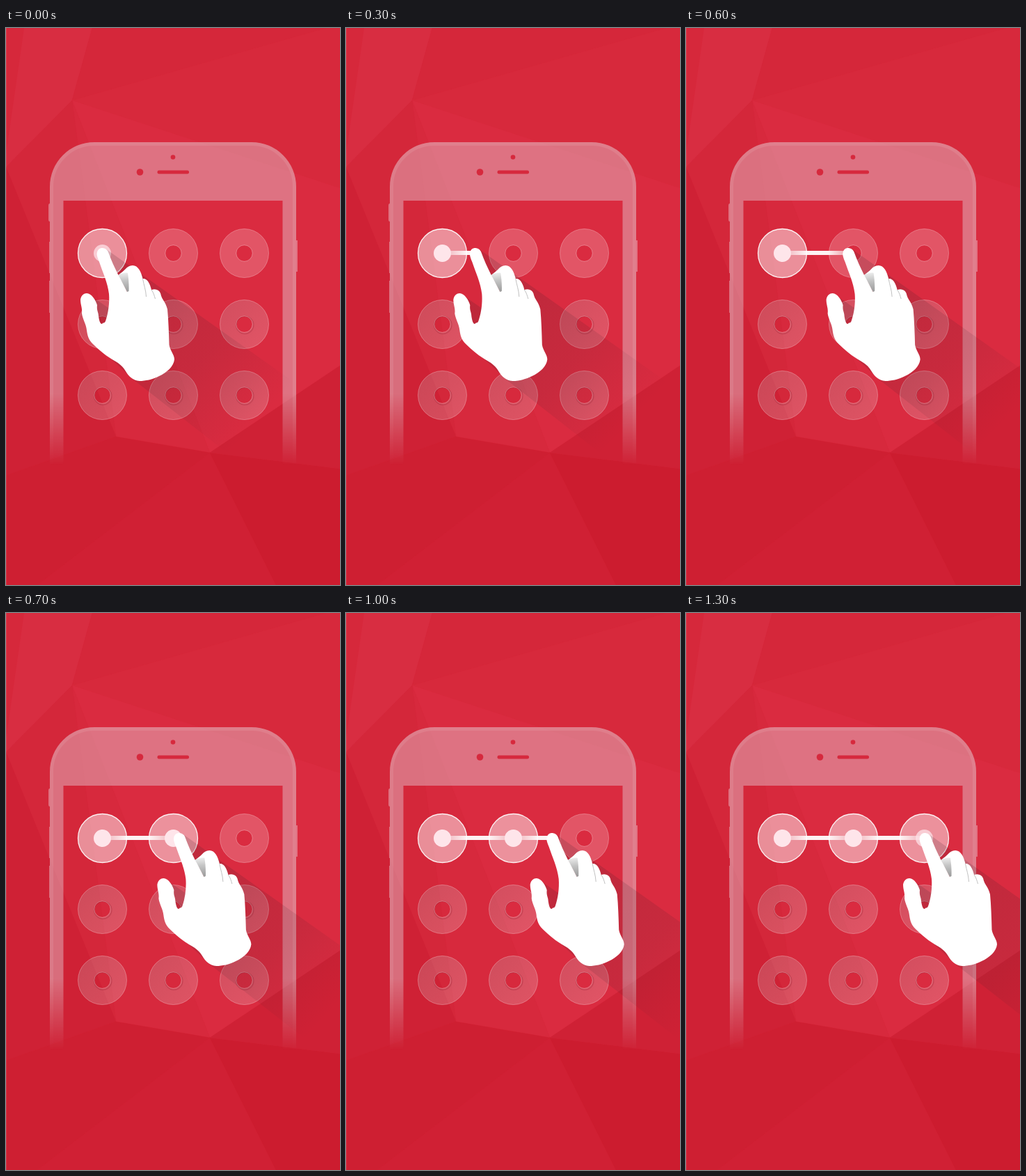
These frames come from a looping animation (480x800 px, 8000 ms). An HTML page:

```html
<!DOCTYPE html>
<html lang="en">
<head>
<meta charset="utf-8">
<title>Pattern unlock</title>
<style>
  html, body { margin: 0; width: 100%; height: 100%; overflow: hidden; background: #d4273a; }
  svg { display: block; width: 100%; height: 100%; }
</style>
</head>
<body>
<svg viewBox="0 0 480 800">
  <defs>
    <linearGradient id="fade" gradientUnits="userSpaceOnUse" x1="0" y1="525" x2="0" y2="628">
      <stop offset="0" stop-color="#fff"/>
      <stop offset="1" stop-color="#000"/>
    </linearGradient>
    <mask id="phoneMask" maskUnits="userSpaceOnUse" x="0" y="0" width="480" height="800">
      <rect width="480" height="800" fill="url(#fade)"/>
    </mask>
    <linearGradient id="trail" gradientUnits="userSpaceOnUse" x1="138.5" y1="0" x2="240.5" y2="0" spreadMethod="repeat">
      <stop offset=".1" stop-color="#fff" stop-opacity=".45"/>
      <stop offset=".36" stop-color="#fff" stop-opacity=".94"/>
      <stop offset=".64" stop-color="#fff" stop-opacity=".94"/>
      <stop offset=".9" stop-color="#fff" stop-opacity=".45"/>
    </linearGradient>
    <linearGradient id="cast" gradientUnits="userSpaceOnUse" x1="190" y1="400" x2="364" y2="564">
      <stop offset="0" stop-color="#40202a" stop-opacity=".17"/>
      <stop offset=".5" stop-color="#40202a" stop-opacity=".12"/>
      <stop offset="1" stop-color="#40202a" stop-opacity="0"/>
    </linearGradient>
    <linearGradient id="crease" gradientUnits="userSpaceOnUse" x1="176" y1="379" x2="173" y2="346">
      <stop offset="0" stop-color="#999"/>
      <stop offset=".5" stop-color="#c4c4c4"/>
      <stop offset="1" stop-color="#fff"/>
    </linearGradient>
    <linearGradient id="dim" x1="0" y1="0" x2="1" y2="1">
      <stop offset="0" stop-color="#702030" stop-opacity=".14"/>
      <stop offset="1" stop-color="#702030" stop-opacity="0"/>
    </linearGradient>
  </defs>

  <g id="facets"></g>

  <g mask="url(#phoneMask)">
    <path fill="#e2bac4" fill-opacity=".5" fill-rule="evenodd"
      d="M63 640V228A64 64 0 0 1 127 164H353A64 64 0 0 1 417 228V640Z M82.5 640H397.5V248H82.5Z"/>
    <path fill="none" stroke="#fff" stroke-opacity=".09" stroke-width="5"
      d="M65.500 640V228A61.500 61.500 0 0 1 127 166.500H353A61.500 61.500 0 0 1 414.500 228V640"/>
    <path fill="#eabac4" fill-opacity=".5"
      d="M63 252Q61 252 61 255V275Q61 278 63 278Z M63 307H62V352H63Z M63 363H62V409H63Z M417 305H419V350H417Z"/>
  </g>
  <g fill="#d6293d">
    <circle cx="240" cy="185.500" r="3.300"/>
    <circle cx="192.500" cy="207" r="4.800"/>
    <rect x="217.500" y="204.500" width="45.500" height="5" rx="2.300"/>
  </g>

  <g id="keys"></g>
  <rect id="line" x="138.500" y="320" height="6" fill="url(#trail)"/>
  <g id="dots" fill="#fee5ea"></g>

  <g id="hand">
    <path fill="url(#cast)" d="M143 317L413 508L320 612L183 505L140 465L118 382L150 404L155 370Z"/>
    <path fill="url(#crease)" d="M161 355C167 351 172 346 177 343L184 350L179 379H174Z"/>
    <path fill="#fff" d="M138 316C142 316 145.500 318 147 322C151 333 156 344 161 354
      C166 363 170 371 174 379L176.500 378C177 369 176 359 175 352
      C173 351 170 352 164 353C170 350 173 341 182 341C190 341 194 350 196.500 360
      C202 359 207 366 209 376C215 374 220 376 222 381C224 391 229 392 232 404
      C233.500 420 234 438 234.500 455C236 464 242 469 242 476
      C241 486 231 495 220 500C210 505 200 507 192 507C182 506 176 500 172 493
      C168 486 163 482 156 478C145 472 133 462 125 454C118 447 117 441 116 434
      C115 425 110 418 109 410C110 402 107 398 107 390C108 384 112 381 116 381
      C123 381 129 391 131 398C130 406 133 408 133 414C134 420 135 425 138 425
      C140 422 141 425 143 421C147 410 149 395 148 382C146 365 139 351 134 336
      C131 329 130 325 131 322C132 318 135 316 138 316Z"/>
    <g fill="none" stroke="#b9b9b9" stroke-width=".9">
      <path d="M196.500 360C198 369 201 376 201.500 386"/>
      <path d="M209 376C212 380 213 384 214.500 389"/>
    </g>
  </g>
</svg>
<script>
const $ = id => document.getElementById(id);
const X0 = 138.5, Y0 = 323.5, GAP = 102;
const STEP = 100, STEPS = 13, TRAVEL = 205, LOOP = 8000;

const facets = [
  ['#d6283b', '0,0 26,0 0,180'],
  ['#d82d41', '26,0 124,0 95,104 0,200 0,180'],
  ['#d5273a', '124,0 460,0 95,104'],
  ['#d7293c', '460,0 480,0 480,230 95,104'],
  ['#da2b40', '95,104 480,230 480,485 293,610'],
  ['#d7293d', '95,104 293,610 158,587'],
  ['#d4273a', '95,104 158,587 0,200'],
  ['#cf2135', '0,200 158,587 0,643'],
  ['#ce1f32', '0,643 158,587 293,610 45,800 0,800'],
  ['#d02034', '293,610 388,800 45,800'],
  ['#cc1c2f', '293,610 480,633 480,800 388,800'],
  ['#cf2135', '293,610 480,485 480,633']
];
$('facets').innerHTML = facets.map(([c, p]) =>
  `<polygon points="${p}" fill="${c}" stroke="${c}" stroke-width=".4"/>`).join('') +
  '<rect width="1" height="800" fill="#fff" fill-opacity=".12"/>';

const disc = (x, y, r) =>
  `M${x - r} ${y}a${r} ${r} 0 1 0 ${2 * r} 0a${r} ${r} 0 1 0 ${-2 * r} 0Z`;

function key(col, row) {
  const x = X0 + col * GAP, y = Y0 + row * GAP;
  const ring = disc(x, y, 35) + disc(x, y, 11.5);
  const shade = row ? `<path d="${ring}" fill="url(#dim)" fill-rule="evenodd"/>
    <circle cx="${x + .8}" cy="${y + 1.2}" r="12.5" fill="none" stroke="#801828" stroke-opacity=".22" stroke-width="1.5"/>` : '';
  const idle = `<g><path d="${ring}" fill="#fff" fill-opacity=".2" fill-rule="evenodd"/>${shade}
    <path d="${disc(x, y, 35) + disc(x, y, 11.7)}" fill="none" stroke="#fff" stroke-opacity=".28"/></g>`;
  const lit = row ? '' : `<circle cx="${x}" cy="${y}" r="35" fill="#fff" fill-opacity=".48"
    stroke="#fff" stroke-opacity=".9" stroke-width="1.3"/>`;
  return `<g>${idle}${lit}</g>`;
}

const cells = [0, 1, 2];
$('keys').innerHTML = cells.map(r => cells.map(c => key(c, r)).join('')).join('');
$('dots').innerHTML = cells.map(c =>
  `<circle cx="${X0 + c * GAP}" cy="${Y0}" r="12.5"/>`).join('');

const keys = [...$('keys').children].slice(0, 3);
const dots = [...$('dots').children];

function draw(now) {
  const n = Math.min(STEPS, Math.floor(now % LOOP / STEP));
  const dx = n * TRAVEL / STEPS;
  $('hand').setAttribute('transform', `translate(${dx})`);
  $('line').setAttribute('width', Math.min(dx, 2 * GAP));
  cells.forEach(c => {
    const on = dx >= c * GAP;
    const [idle, lit] = keys[c].children;
    idle.style.display = on ? 'none' : '';
    lit.style.display = on ? '' : 'none';
    dots[c].style.display = on ? '' : 'none';
    dots[c].style.opacity = Math.abs(dx - c * GAP) < 3 ? .72 : 1;
  });
}

const start = performance.now();
function tick() {
  draw(performance.now() - start);
  requestAnimationFrame(tick);
}
tick();
</script>
</body>
</html>
```
